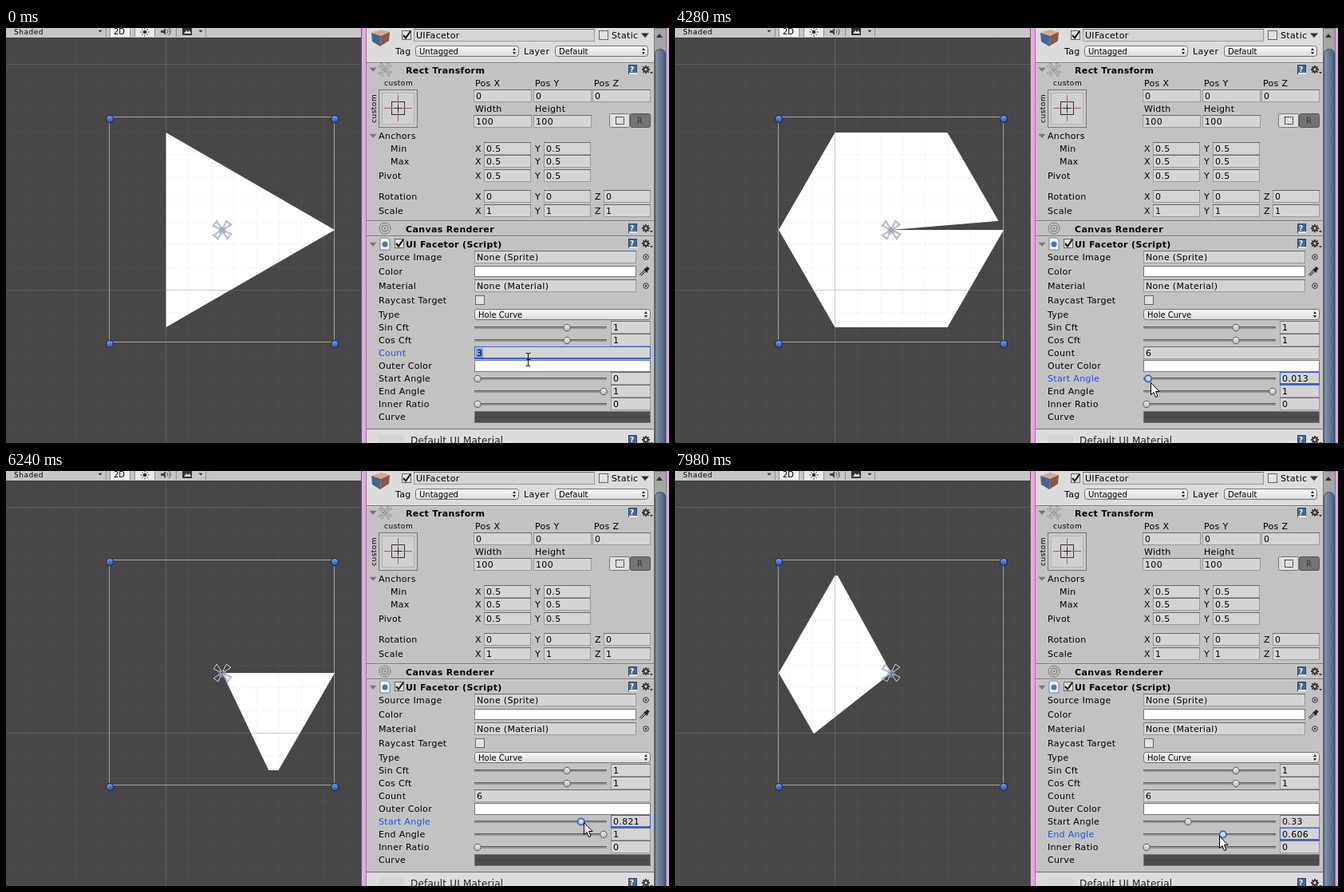
An HTML page with a canvas that plays this animation: 831x520 px, repeating every 8 s.

```html
<!DOCTYPE html>
<html>
<head>
<meta charset="utf-8">
<title>Polygon inspector</title>
<style>
html, body { margin: 0; width: 100%; height: 100%; overflow: hidden; background: #474747; }
canvas { display: block; }
</style>
</head>
<body>
<canvas id="stage" width="831" height="520"></canvas>
<script>
const c = document.getElementById('stage').getContext('2d');
const LOOP = 8000, TAU = Math.PI * 2, CX = 271, CY = 253, R = 141, TRACK = 158;
const BLUE = '#1f4fe6', FOCUS = '#3c5fd2', PANEL = '#c2c2c2', LIGHT = '#dcdcdc';

// Progress from 0 to 1 between two times, easing in or out by a power
const ramp = (t, a, b, p = 1) => Math.min(1, Math.max(0, (t - a) / (b - a))) ** p;
const rampOut = (t, a, b, p) => 1 - ramp(t, b, a, p);

// The start slider creeps off, runs to the right in three drags, then swings back
const startAngle = t => .122 * ramp(t, 3920, 4470, 5.28) + .608 * ramp(t, 4620, 5150)
  + .114 * ramp(t, 5300, 5450) + .156 * ramp(t, 5600, 5850)
  - .29 * ramp(t, 6000, 6390) - .38 * rampOut(t, 6390, 6700, 2.19);
const endAngle = t => 1 - .07 * ramp(t, 7480, 7640) - .324 * ramp(t, 7640, 7980);

function box(x, y, w, h, fill, line) {
  if (fill) { c.fillStyle = fill; c.fillRect(x, y, w, h); }
  if (line) { c.strokeStyle = line; c.lineWidth = 1; c.strokeRect(x + .5, y + .5, w - 1, h - 1); }
}

function text(s, x, y, { size = 11, bold = false, color = '#000', gap = .32 } = {}) {
  c.font = `${bold ? 'bold ' : ''}${size}px "DejaVu Sans", sans-serif`;
  c.letterSpacing = gap + 'px';
  c.fillStyle = color;
  c.fillText(s, x, y);
}
const mini = (s, x, y) => text(s, x, y, { size: 10, gap: 0 });

function paint(fill, line, width) {
  if (fill) { c.fillStyle = fill; c.fill(); }
  if (line) { c.strokeStyle = line; c.lineWidth = width; c.stroke(); }
}

function shape(points, fill, line, width = 1) {
  c.beginPath();
  points.forEach(p => c.lineTo(...p));
  c.closePath();
  paint(fill, line, width);
}

function stroke(points, color, width = 1) {
  c.beginPath();
  points.forEach(p => c.lineTo(...p));
  paint(null, color, width);
}

function disc(x, y, r, fill, line, width = 1) {
  c.beginPath();
  c.arc(x, y, r, 0, TAU);
  paint(fill, line, width);
}

function round(x, y, w, h, r, fill, line) {
  c.beginPath();
  c.roundRect(x + .5, y + .5, w - 1, h - 1, r);
  paint(fill, line, 1);
}

function fade(x0, y0, x1, y1, from, to) {
  const g = c.createLinearGradient(x0, y0, x1, y1);
  g.addColorStop(0, from);
  g.addColorStop(1, to);
  return g;
}

function rays(x, y, from, to, color, width = 1) {
  for (let a = 0; a < TAU; a += TAU / 8) {
    const p = r => [x + r * Math.cos(a), y + r * Math.sin(a)];
    stroke([p(from), p(to)], color, width);
  }
}

const down = (x, y, r, color) => shape([[x - r, y - r / 2], [x + r, y - r / 2], [x, y + r / 1.6]], color);

function field(x, y, w, s = '', focus = false) {
  box(x, y, w, 16, '#d4d4d4', focus ? FOCUS : '#9a9a9a');
  box(x, focus ? y + 14 : y, w, focus ? 2 : 1, focus ? FOCUS : '#6b6b6b');
  text(s, x + 3, y + 12);
}

function popup(x, y, w, s) {
  round(x, y, w, 14, 3, fade(0, y, 0, y + 14, '#fafafa', '#dadada'), '#707070');
  mini(s, x + 5, y + 11);
  const ax = x + w - 6;
  for (const d of [-1, 1]) shape([[ax - 2, y + 7 + d], [ax + 2, y + 7 + d], [ax, y + 7 + d * 4]], '#222');
}

function check(x, y, on) {
  box(x, y, 12, 12, '#e2e2e2', '#666');
  if (on) stroke([[x + 2, y + 6], [x + 5, y + 9.5], [x + 11, y + 1]], '#111', 2);
}

function blades(x, y, r, rim, line) {
  for (let i = 0; i < 4; i++) {
    c.save();
    c.translate(x, y);
    c.rotate(TAU / 8 + i * TAU / 4);
    const p = [[2, -.8], [r, -r * .36], [r + 1, r * .25], [2, .8]];
    shape(p, null, rim, 1.8);
    shape(p, null, line, .9);
    c.restore();
  }
}

function tools(y) {
  box(780, y - 6, 11, 12, '#4a6890', '#2c4466');
  box(781, y + 4, 10, 2, '#e4eaf1');
  text('?', 782, y + 3, { size: 9, bold: true, color: '#fff', gap: 0 });
  rays(802, y, 3, 5, '#333', 1.8);
  disc(802, y, 2.6, null, '#333', 1.8);
  down(809, y + 4, 2, '#333');
}

function rule(y) {
  box(452, y, 360, 1, '#757575');
  box(452, y + 1, 360, 1, '#d6d6d6');
}

const label = (s, y, focus) => text(s, 467, y + 4, { color: focus ? BLUE : '#000' });

function slider(name, y, v, s, focus) {
  label(name, y, focus);
  box(587, y - 1, 166, 3, '#929292');
  box(587, y - 1, 166, 1, '#5c5c5c');
  const metal = fade(0, y - 4, 0, y + 5, '#f0f0f0', '#b8b8b8');
  disc(591 + TRACK * v, y + .5, 4.2, metal, focus ? FOCUS : '#555', focus ? 1.8 : 1);
  field(758, y - 8, 50, s, focus);
}

function polygon(n, from, to) {
  if (!n || from >= to) return;
  const seg = TAU / n;
  const edge = f => {
    const a = f * TAU, r = R * Math.cos(seg / 2) / Math.cos(a % seg - seg / 2);
    return [CX + r * Math.cos(a), CY - r * Math.sin(a)];
  };
  const pts = [[CX, CY], edge(from)];
  for (let i = 1; i < n; i++) if (i / n > from && i / n < to) pts.push(edge(i / n));
  pts.push(edge(to));
  shape(pts, '#fff');
}

function scene(n, from, to) {
  box(0, 0, 446, 520, '#474747');
  polygon(n, from, to);
  for (let i = -10; i < 9; i++) {
    const tone = `rgba(130,130,130,${i % 10 ? .065 : .42})`;
    box(Math.round(200 + i * 28.3), 13, 1, 507, tone);
    box(0, Math.round(328 + i * 28.3), 446, 1, tone);
  }
  box(129, 111, 283, 283, null, 'rgba(255,255,255,.5)');
  for (const x of [130, 412]) for (const y of [114, 396]) {
    disc(x, y, 4.5, fade(0, y - 4, 0, y + 4, '#6f9bf5', '#2853bd'), '#1b2745', 1.2);
  }
  disc(CX, CY + 1, 5, 'rgba(150,175,215,.5)');
  blades(CX, CY, 11.5, 'rgba(45,55,75,.6)', 'rgba(236,240,246,.95)');
}

function toolbar() {
  box(0, 0, 446, 12, '#c6c6c6');
  box(0, 12, 446, 1, '#3a3a3a');
  box(131, 0, 24, 11, '#f4f4f4');
  box(162, 0, 24, 11, '#eaeaea');
  for (const x of [125, 130, 155, 161, 186, 213, 250]) box(x, 0, 1, 11, '#8f8f8f');
  text('Shaded', 10, 8, { size: 9, gap: .5 });
  mini('2D', 135, 8);
  down(118, 4, 2.5, '#333');
  rays(174, 5, 3.5, 5.5, '#333');
  disc(174, 5, 2.3, '#333');
  shape([[194, 3], [197, 3], [200, 0], [200, 9], [197, 6], [194, 6]], '#444');
  for (const r of [3, 6]) {
    c.beginPath();
    c.arc(200, 4.5, r, -.9, .9);
    paint(null, '#444', 1);
  }
  box(221, 0, 12, 9, '#333');
  shape([[223, 7], [226, 3], [228, 5], [230, 3], [232, 7]], '#ddd');
  down(244, 4, 2.5, '#333');
}

function frame() {
  box(445, 0, 386, 520, '#eaa6e5');
  box(445, 0, 1, 520, '#6a5b69');
  box(451, 0, 1, 520, '#927c91');
  box(452, 0, 360, 520, PANEL);
  box(812, 0, 16, 520, '#a6a6a6', '#777');
  shape([[815, 12], [823, 12], [819, 7]], '#333');
  round(813, 26, 14, 511, 6, fade(813, 0, 827, 0, '#8299b5', '#475c77'), '#3c4c60');
}

function header() {
  box(452, 0, 360, 43, LIGHT);
  shape([[458, 6], [470, 2], [481, 5], [470, 10]], '#d8a68a');
  shape([[458, 6], [470, 10], [469, 23], [459, 17]], '#47648f');
  shape([[470, 10], [481, 5], [480, 16], [469, 23]], '#8b5844');
  check(496, 3, true);
  field(511, 1, 227, 'UIFacetor');
  check(743, 3, false);
  text('Static', 759, 13);
  down(801, 9, 5, '#333');
  text('Tag', 488, 33);
  popup(513, 22, 130, 'Untagged');
  text('Layer', 649, 33);
  popup(688, 22, 117, 'Default');
  rule(43);
}

function title(s, y) {
  text(s, 501, y + 5, { bold: true, gap: .35 });
  tools(y);
}

function anchorPreset() {
  const tag = { size: 9, gap: .5 };
  text('custom', 474, 72, tag);
  c.save();
  c.translate(464, 119);
  c.rotate(-TAU / 4);
  text('custom', 0, 0, tag);
  c.restore();
  box(467, 77, 49, 48, '#c9c9c9', '#777');
  box(471, 81, 41, 40, '#d0d0d0', '#b4b4b4');
  box(483, 92, 17, 17, null, '#333');
  box(491, 84, 1, 33, '#a3635a');
  box(474, 100, 35, 1, '#a3635a');
  box(487, 100, 9, 1, '#222');
  box(491, 96, 1, 9, '#222');
}

function rectTransform() {
  down(460, 52, 4.5, '#777');
  blades(475, 52, 7.5, '#666', '#f2f2f2');
  title('Rect Transform', 52);
  anchorPreset();
  ['X', 'Y', 'Z'].forEach((s, i) => {
    const x = Math.round(586 + 74.5 * i);
    text('Pos ' + s, x + 2, 73);
    field(x, 77, 73, '0');
    if (i > 1) return;
    text(i ? 'Height' : 'Width', x + 2, 105);
    field(x, 109, 73, '100');
  });
  round(756, 107, 26, 18, 2, '#dedede', '#777');
  round(782, 107, 26, 18, 2, '#747474', '#555');
  c.setLineDash([2, 1]);
  box(764, 111, 11, 10, null, '#111');
  c.setLineDash([]);
  text('R', 791, 120, { size: 10, color: '#3a3a3a' });

  down(460, 135, 4.5, '#777');
  label('Anchors', 135);
  const rows = [['Min', 482, 151, '0.5'], ['Max', 482, 167, '0.5'], ['Pivot', 467, 185, '0.5'],
    ['Rotation', 467, 211, '0'], ['Scale', 467, 229, '1']];
  for (const [name, x, y, v] of rows) {
    text(name, x, y + 4);
    [...(y > 200 ? 'XYZ' : 'XY')].forEach((s, i) => {
      text(s, 588 + 75 * i, y + 4);
      field(599 + 75 * i, y - 8, 59, v);
    });
  }
}

function source(name, y, value) {
  label(name, y);
  field(587, y - 8, 203, value);
  disc(802, y, 3.3, null, '#333');
  disc(802, y, 1.2, '#333');
}

function script(n, from, to, focus, selected) {
  rule(241);
  for (const r of [7, 4, 1]) disc(475, 251, r, null, '#777');
  title('Canvas Renderer', 251);
  rule(260);
  down(460, 271, 4.5, '#777');
  shape([[469, 263], [478, 263], [481, 266], [481, 278], [469, 278]], '#eef1f5', '#72839c');
  disc(475, 271, 3.5, '#4d73b3');
  check(487, 264, true);
  title('UI Facetor (Script)', 270);

  source('Source Image', 287, 'None (Sprite)');
  label('Color', 305);
  box(587, 298, 203, 14, '#fff', '#777');
  stroke([[795, 310], [801, 304]], '#333', 3);
  stroke([[795, 310], [801, 304]], '#eee');
  stroke([[800, 302], [804, 306]], '#222', 2);
  stroke([[802, 304], [805, 300]], '#222', 4);
  source('Material', 323, 'None (Material)');
  label('Raycast Target', 341);
  check(588, 335, false);
  label('Type', 359);
  popup(587, 352, 221, 'Hole Curve');

  const row = i => 375 + 16 * i, show = v => String(+v.toFixed(3));
  const typing = focus === 'count';
  slider('Sin Cft', row(0), .709, '1');
  slider('Cos Cft', row(1), .709, '1');
  label('Count', row(2), typing);
  label('Outer Color', row(3));
  box(587, 416, 221, 15, '#fff', '#777');
  field(587, 399, 221, '', typing);
  if (selected) box(589, 401, 9, 12, '#719bd8');
  text(n || '', 590, 411);
  if (typing && !selected) box(n ? 597 : 590, 401, 1, 12, '#000');
  slider('Start Angle', row(4), from, show(from), focus === 'start');
  slider('End Angle', row(5), to, show(to), focus === 'end');
  slider('Inner Ratio', row(6), 0, '0');
  label('Curve', row(7));
  box(587, 480, 221, 15, '#4e4e4e', '#777');
  box(588, 487, 219, 1, '#35463a');

  rule(502);
  box(452, 504, 360, 16, LIGHT);
  box(467, 509, 32, 11, '#d4d4d4');
  text('Default UI Material', 507, 521, { size: 12, gap: .2, color: '#222' });
  tools(516);
}

function textCursor(x, y) {
  for (const s of [-1, 1]) {
    stroke([[x - 3, y + 8 * s], [x - .5, y + 8 * s], [x, y + 6 * s], [x + .5, y + 8 * s], [x + 3, y + 8 * s]], '#111');
  }
  stroke([[x, y - 7], [x, y + 7]], '#111');
  stroke([[x - 2, y], [x + 3, y]], '#111');
}

function cursor(t, from, to) {
  if (t < 2260) return textCursor(654.5, 415.5);
  const out = ramp(t, 2260, 2600), back = ramp(t, 2600, 2830), cross = ramp(t, 6870, 7300);
  // Dragging carries the pointer along with the knob it holds
  const x = 653 - 88 * out + 29 * back + 98 * cross + TRACK * (from + to - 1);
  const y = 416 + 51 * out - 23 * back - 6 * ramp(t, 4470, 5450) + 3 * ramp(t, 5600, 6600) + 16 * cross;
  const arrow = [[0, 0], [0, 15], [3.5, 12], [6, 18], [8.5, 17], [6, 11], [10.5, 11]];
  shape(arrow.map(([dx, dy]) => [Math.round(x) + .5 + dx, Math.round(y) + .5 + dy]), '#fff', '#000');
}

function draw(t) {
  const n = t < 450 ? 3 : t < 1240 ? 5 : t < 1320 ? 0 : 6;
  const from = startAngle(t), to = endAngle(t);
  const focus = t < 3490 ? 'count' : t < 7380 ? 'start' : 'end';
  scene(n, from, to);
  toolbar();
  frame();
  header();
  rectTransform();
  script(n, from, to, focus, t < 450);
  cursor(t, from, to);
}

const began = performance.now();
function tick() {
  draw((performance.now() - began) % LOOP);
  requestAnimationFrame(tick);
}
tick();
</script>
</body>
</html>
```
